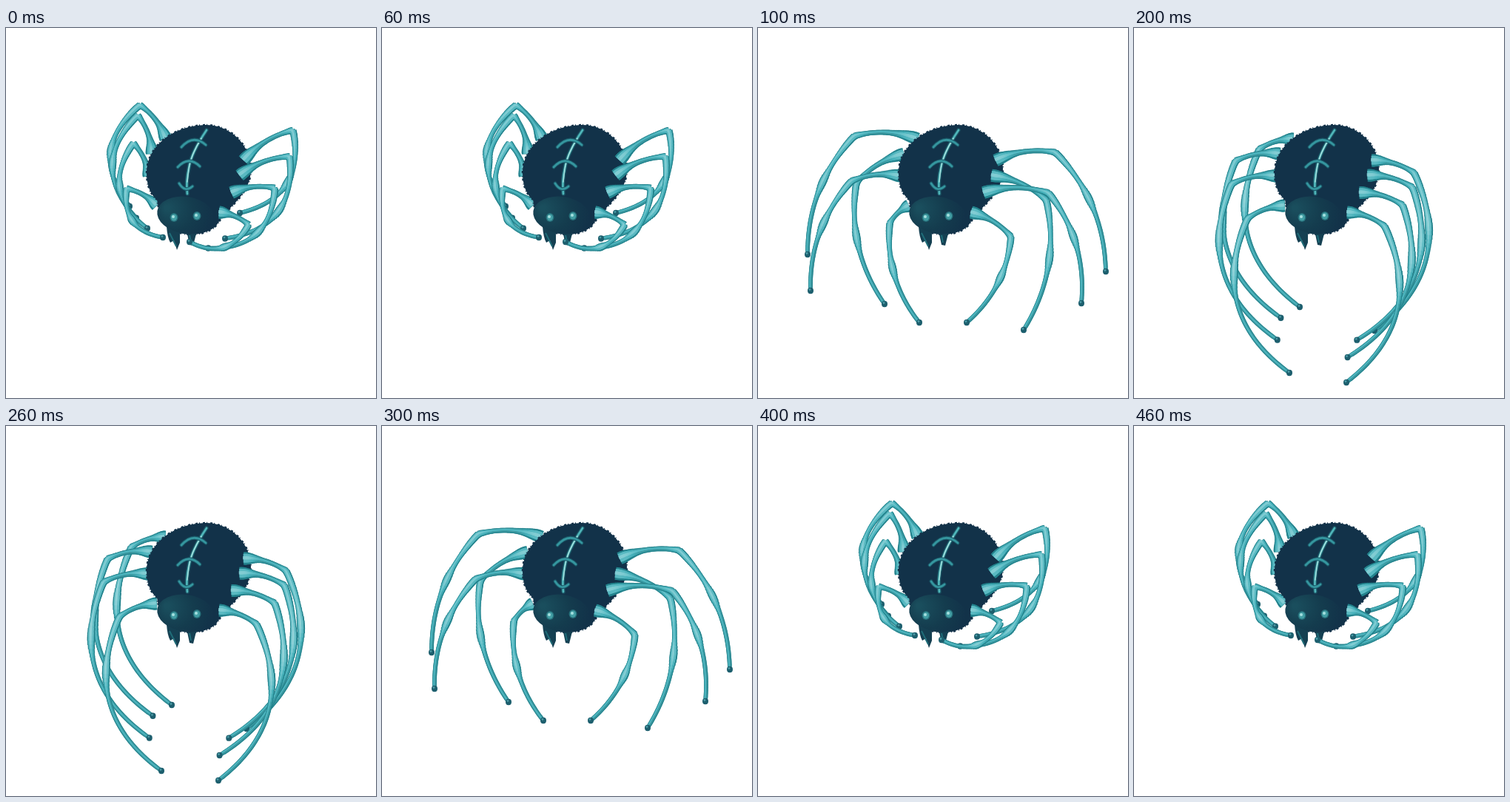
An HTML page with a canvas that plays this animation: 500 by 500 pixels, repeating every 0.5 s.

```html
<!DOCTYPE html>
<html lang="en">
<head>
<meta charset="utf-8">
<title>Spider</title>
<style>
html, body { margin: 0; width: 100%; height: 100%; overflow: hidden; background: #fff; }
canvas { display: block; }
</style>
</head>
<body>
<canvas id="stage" width="500" height="500"></canvas>
<script>
const ctx = document.getElementById('stage').getContext('2d');
const STEP = 100, LEFT = -1, RIGHT = 1, THIGH_BOW = 0.08;

// Point at t on a quadratic curve.
function bezier(a, pull, b, t) {
  const s = 1 - t;
  return [0, 1].map(i => s * s * a[i] + 2 * s * t * pull[i] + t * t * b[i]);
}

// Four joints spaced along a curve, from the back leg to the front one.
const fan = (back, pull, front) => [0, 1, 2, 3].map(i => bezier(back, pull, front, i / 3));

const hips = {
  [LEFT]: fan([216, 150], [177, 173], [204, 240]),
  [RIGHT]: fan([321, 179], [317, 207], [288, 249])
};

// bow: how far the shins bend outward; ankle: where the shin has its joint.
const curled = {
  bow: 0.24, ankle: 0.45,
  [LEFT]: { knees: fan([181, 104], [179, 107], [163, 217]), feet: fan([167, 241], [176, 266], [212, 283]) },
  [RIGHT]: { knees: fan([388, 138], [393, 186], [328, 266]), feet: fan([316, 250], [288, 318], [248, 289]) }
};
const tucked = {
  bow: 0.2, ankle: 0.28,
  [LEFT]: { knees: fan([169, 164], [101, 176], [153, 258]), feet: fan([224, 377], [170, 388], [210, 466]) },
  [RIGHT]: { knees: fan([379, 196], [384, 222], [339, 268]), feet: fan([325, 409], [281, 420], [287, 479]) }
};
// Here the legs alternate between reaching out and standing close.
const spread = {
  bow: 0.1, ankle: 0.4,
  [LEFT]: {
    knees: [[130, 146], [133, 209], [126, 207], [178, 264]],
    feet: [[67, 306], [171, 373], [71, 355], [218, 398]]
  },
  [RIGHT]: {
    knees: [[402, 168], [390, 233], [393, 223], [342, 282]],
    feet: [[470, 329], [359, 408], [437, 372], [282, 398]]
  }
};
const cycle = [curled, spread, tucked, spread, curled];

const bump = (u, centre, size) => Math.exp(-(((u - centre) / size) ** 2));

function oval(x, y, rx, ry, color, tilt = 0) {
  ctx.fillStyle = color;
  ctx.beginPath();
  ctx.ellipse(x, y, rx, ry, tilt, 0, 7);
  ctx.fill();
}

function curve(path, width, color) {
  ctx.lineWidth = width;
  ctx.strokeStyle = color;
  ctx.stroke(new Path2D(path));
}

// Samples a limb from a to b that bends outward by a share of its length.
function limb(a, b, bow, side, count) {
  const dx = b[0] - a[0], dy = b[1] - a[1], k = 2 * bow * side;
  const pull = [(a[0] + b[0]) / 2 + k * dy, (a[1] + b[1]) / 2 - k * dx];
  return Array.from({ length: count }, (_, i) => bezier(a, pull, b, i / count));
}

function drawLeg(hip, knee, foot, pose, side) {
  const count = 40, ankle = 1 + pose.ankle;
  const points = [
    ...limb(hip, knee, THIGH_BOW, side, count),
    ...limb(knee, foot, pose.bow, side, count),
    foot
  ];
  const pass = (scale, shift, color) => {
    for (let i = 0; i < points.length - 2; i++) {
      const u = i / count, [x1, y1] = points[i], [x2, y2] = points[i + 2];
      const width = 7 - 0.7 * u + 10 * bump(u, 0, 0.25)
        + 3 * bump(u, 1, 0.14) + 4.5 * bump(u, ankle, 0.08);
      ctx.lineWidth = width * scale;
      ctx.strokeStyle = color(u);
      ctx.beginPath();
      ctx.moveTo(x1 - shift, y1 - shift);
      ctx.lineTo(x2 - shift, y2 - shift);
      ctx.stroke();
    }
  };
  const glow = u => bump(u, 0.05, 0.2) + bump(u, 1.05, 0.2) + bump(u, ankle, 0.12);
  pass(1, 0, () => '#23838d');
  pass(0.7, 0.3, u => `hsl(185 46% ${43 + 13 * glow(u)}%)`);
  pass(0.25, 0.8, u => `hsl(185 48% ${53 + 14 * glow(u)}%)`);
  oval(...foot, 4, 4.2, '#1d5f6e');
  oval(foot[0] - 1, foot[1] - 1.5, 1.4, 1.4, '#4b9ca6');
}

function drawLegs(pose, side) {
  const { knees, feet } = pose[side];
  hips[side].forEach((hip, i) => drawLeg(hip, knees[i], feet[i], pose, side));
}

function drawBody() {
  const fur = '#123249';
  const shape = 'M190 196C190 160 225 132 270 131C305 131 331 160 331 190C331 225 303 238 287 263' +
    'C279 277 255 282 235 277C212 272 206 245 204 232C195 225 190 212 190 196Z';
  ctx.fillStyle = fur;
  ctx.fill(new Path2D(shape));
  ctx.setLineDash([3, 2, 1, 4]);
  curve(shape, 2.5, fur);
  ctx.setLineDash([]);

  ctx.fillStyle = '#154052';
  ctx.fill(new Path2D('M217 268Q218 283 222 290L227 287L231 300L235 290V275Z M244 274L248 293L253 294L258 274Z'));
  curve('M221 277L230 295M248 280L250 290', 2, '#1f6c78');

  const shade = ctx.createRadialGradient(217, 243, 3, 236, 250, 45);
  shade.addColorStop(0, '#1a4e5d');
  shade.addColorStop(0.55, '#143c4e');
  shade.addColorStop(1, fur);
  oval(243, 253, 39, 25, shade, 0.15);
  for (const [x, y] of [[227, 256], [258, 254]]) {
    oval(x, y, 5.5, 6, '#27717b');
    oval(x, y, 4, 4.5, '#439fa5');
    oval(x - 1, y - 1, 2, 2, '#a5e0df');
  }

  ctx.lineCap = 'round';
  const seam = 'M271 138Q250 169 247 190Q243 207 245 224';
  curve(seam, 5.5, '#1a5262');
  curve(seam, 2.8, '#4fb5b9');
  curve('M264 149Q250 171 247 190L245 208', 1.4, '#a6dfdd');
  const stitches = 'M237 161Q253 143 270 158M232 188Q247 172 262 187M234 210Q242 223 252 214';
  curve(stitches, 5, '#195464');
  curve(stitches, 2.8, '#35969f');
  ctx.lineCap = 'butt';
}

function frame() {
  const pose = cycle[Math.floor(performance.now() / STEP) % cycle.length];
  ctx.clearRect(0, 0, 500, 500);
  drawLegs(pose, LEFT);
  drawBody();
  drawLegs(pose, RIGHT);
  requestAnimationFrame(frame);
}
frame();
</script>
</body>
</html>
```
